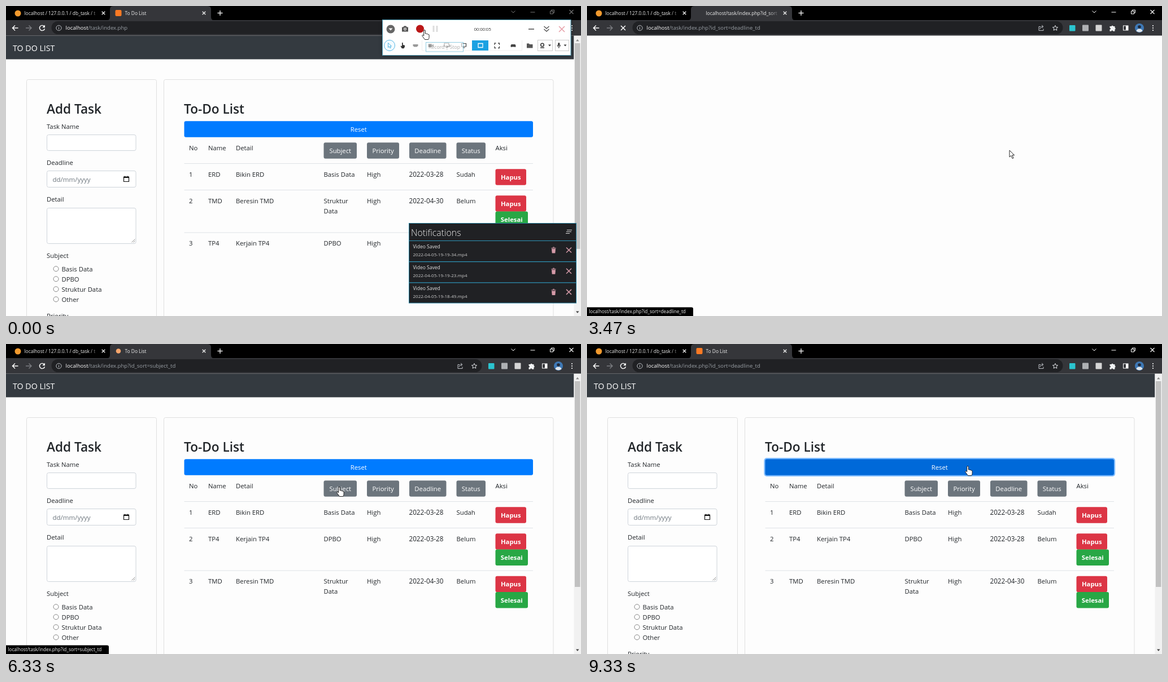
Animation of 1018 by 550 pixels, one loop 9.56 s. Source, as an HTML page:

```html
<!DOCTYPE html>
<html lang="id">
<head>
<meta charset="utf-8">
<title>To Do List</title>
<style>
  html, body { margin: 0; width: 100%; height: 100%; overflow: hidden; background: #fdfdfd; }
  svg { display: block; font-family: "Open Sans", "Noto Sans", sans-serif; }
  text { white-space: pre; }
</style>
</head>
<body>
<svg id="stage" width="1018" height="550" viewBox="0 0 1018 550"></svg>
<script>
const LOOP = 9560, INK = '#212529', GREY = '#6c757d';

// Drawing helpers
const text = (x, y, s, size = 11.3, fill = INK, more = '') =>
  `<text x="${x}" y="${y}" font-size="${size}" fill="${fill}" ${more}>${s}</text>`;
const rect = (x, y, w, h, fill, r = 0, more = '') =>
  `<rect x="${x}" y="${y}" width="${w}" height="${h}" rx="${r}" fill="${fill}" ${more}/>`;
const line = (d, stroke, width = 1, more = '') =>
  `<path d="${d}" fill="none" stroke="${stroke}" stroke-width="${width}" ${more}/>`;
const shape = (d, fill, more = '') => `<path d="${d}" fill="${fill}" ${more}/>`;
const dot = (x, y, r, fill, more = '') => `<circle cx="${x}" cy="${y}" r="${r}" fill="${fill}" ${more}/>`;
const at = (x, y, body) => `<g transform="translate(${x} ${y})">${body}</g>`;
const cross = (x, y, r, stroke, width = 1.3) =>
  line(`M${x - r} ${y - r}l${2 * r} ${2 * r}m0 ${-2 * r}l${-2 * r} ${2 * r}`, stroke, width);
const frame = (x, y, w, h, stroke, r = 3, fill = 'none') =>
  rect(x, y, w, h, fill, r, `stroke="${stroke}"`);
const button = (x, y, w, label, fill, bold, ring) =>
  (ring ? rect(x - 2.2, y - 2.2, w + 4.4, 32.9, ring, 5) : '') +
  rect(x, y, w, 28.5, fill, 3) +
  text(x + w / 2, y + 18.6, label, 11.3, '#fff', `text-anchor="middle"${bold ? ' font-weight="700"' : ''}`);
const clamp = v => Math.max(0, Math.min(1, v));

// Pointer tip: time, x, y
const path = [
  [700, 741, 43], [950, 800, 150], [1200, 886, 254], [1450, 888, 259], [1650, 872, 257],
  [1880, 833, 256], [2670, 833, 256], [3150, 748, 256], [4000, 748, 256], [4300, 694, 255],
  [4550, 667, 255], [5050, 667, 255], [5750, 590, 254], [7270, 590, 254], [7700, 670, 257],
  [8080, 746, 255], [8620, 746, 255], [8860, 712, 232], [9140, 680, 188], [9200, 677, 188],
  [9260, 674, 217]
];
function pointer(t) {
  const i = path.findIndex(p => p[0] > t);
  if (i < 0) return path.at(-1).slice(1);
  if (i === 0) return path[0].slice(1);
  const [t0, x0, y0] = path[i - 1], [t1, x1, y1] = path[i], k = (t - t0) / (t1 - t0);
  return [x0 + (x1 - x0) * k, y0 + (y1 - y0) * k];
}

const heads = [
  ['Subject', 562.5, 58.5], ['Priority', 639, 57], ['Deadline', 714, 65.5], ['Status', 797.5, 51.5]
];
function hovered(t) {
  const [x, y] = pointer(t);
  if (y > 204 && y < 233 && x > 315 && x < 933) return 'Reset';
  if (y > 242 && y < 271) return heads.find(h => x > h[1] && x < h[1] + h[2])?.[0];
}

const tasks = {
  ERD: ['Bikin ERD', 'Basis Data', '2022-03-28', 'Sudah'],
  TMD: ['Beresin TMD', 'Struktur Data', '2022-04-30', 'Belum'],
  TP4: ['Kerjain TP4', 'DPBO', '2022-03-28', 'Belum']
};
// Each page load: click, blank from, blank until, icon settled
const loads = [
  { key: 'Status', click: 2080, blank: 2150, shown: 2280, done: 2500, order: 'TMD TP4 ERD' },
  { key: 'Deadline', click: 3300, blank: 3400, shown: 3560, done: 3830, order: 'ERD TP4 TMD' },
  { key: 'Priority', click: 4640, blank: 4730, shown: 4870, done: 5120, order: 'ERD TMD TP4' },
  { key: 'Subject', click: 5970, blank: 6120, shown: 6270, done: 6570, order: 'ERD TP4 TMD' },
  { key: 'Deadline', click: 8230, blank: 8310, shown: 8450, done: 8700, order: 'ERD TP4 TMD' }
];
const query = key => `localhost/task/index.php?id_sort=${key.toLowerCase()}_td`;

function browser(load, t, active) {
  const blank = load && t < load.shown, loading = load && t < load.done;
  const dim = active ? '#fff' : '#777', icon = '#dfe1e5';
  const address = load ? query(load.key) : 'localhost/task/index.php';
  return rect(0, 0, 1018, 25, '#000') + rect(0, 25, 1018, 27.5, '#35363a') +
    shape('M178 25.5q6 0 6-6V6q0-6 6-6H357q6 0 6 6v13.5q0 6 6 6z', '#35363a') +
    dot(21, 13, 5.5, '#f29a2e') +
    text(32.5, 16, 'localhost / 127.0.0.1 / db_task / t', 8.4, 'url(#fadeA)') + cross(172.5, 12.5, 2.8, '#eee') +
    (blank ? '' : loading ? dot(199, 12.5, 4.3, '#f5a56c') : rect(193.5, 7, 11, 11, '#fb7a24', 2)) +
    text(210.5, 16, blank ? address.slice(0, 32) : 'To Do List', 8.4, 'url(#fadeB)') + cross(350.5, 12.5, 2.8, '#eee') +
    line('M374.5 12.5h9m-4.5-4.5v9', '#eee', 1.4) +
    line('M894.5 8.5l3.5 3.5 3.5-3.5', dim) + line('M928.5 11h8', dim) +
    line('M963.5 9h5v5h-5zm2 0V7h5v5h-2', dim) + cross(1001, 10.5, 3.5, dim, 1.1) +
    line('M21.5 39h-10m4.5-4.5L11.5 39l4.5 4.5', '#fff', 1.5) +
    line('M35 39h10m-4.5-4.5L45 39l-4.5 4.5', '#7c7e82', 1.4) +
    (blank ? cross(64, 39, 4, '#fff', 1.5) :
      line('M67.7 36.2a4.6 4.6 0 1 0 .8 4', '#fff', 1.4) + shape('M69 33.5v4.7h-4.7z', '#fff')) +
    rect(80.5, 27, 762, 23, '#202124', 11.5) +
    dot(93.5, 39, 4.6, 'none', 'stroke="#bdc1c6"') + line('M93.5 38.3v3.2m0-5v1.1', '#bdc1c6') +
    text(105.5, 42.3, `<tspan fill="#fff">localhost</tspan>${address.slice(9)}`, 9.55, '#9aa0a6') +
    line('M803 36.5h-3v7h8v-3M802 41q.5-4.500 5-4.500M805 34l3 2.500-3 2.500', '#bdc1c6') +
    line('M829 34.500l1.300 3 3.300.3-2.500 2.200.8 3.200-2.900-1.700-2.900 1.700.8-3.200-2.500-2.200 3.300-.3z', icon) +
    rect(854, 34, 10.500, 10.500, '#2bc4cf', 1) + rect(877, 33.500, 11, 11, '#aeb0b3', 1) + rect(900.500, 33.500, 11, 11, '#d5d5d5', 1) +
    shape('M925.500 36h3a1.700 1.700 0 0 1 3.200 0h2.800v2.500a1.700 1.700 0 0 1 0 3.200v3h-3.200a1.500 1.500 0 0 0-3 0h-2.800v-3.200a1.500 1.500 0 0 0 0-3z', '#f1f3f4') +
    frame(949.500, 35, 8.500, 8, '#fff', 0) + rect(954, 35, 4, 8, '#fff') +
    dot(978, 39, 8, '#3e78b5') + dot(978, 37, 2.800, '#202939') + shape('M972.500 44.500q1-4 5.500-4t5.500 4q-5.500 4-11 0z', '#e0e6ec') +
    [35, 39, 43].map(y => dot(1002, y, 1.100, '#fff')).join('');
}

function form() {
  const label = (y, s) => text(72, y, s);
  return frame(36.500, 130.500, 230, 440, '#dfdfdf') +
    text(72, 191, 'Add Task', 22.600, INK, 'font-weight="600"') +
    label(217.500, 'Task Name') + frame(72.500, 228.500, 157.500, 28, '#ced4da', 3, '#fff') +
    label(282, 'Deadline') + frame(72.500, 292.500, 157.500, 29, '#ced4da', 3, '#fff') +
    text(82.500, 312, 'dd/mm/yyyy', 11.500, GREY) +
    line('M208.500 303.500h9v8h-9z', '#111', 1.200) + rect(208, 302.500, 10, 2.500, '#111') + line('M210.500 301.500v2m5-2v2', '#111') +
    label(347, 'Detail') + frame(72.500, 358.500, 157.500, 63, '#ced4da', 3, '#fff') +
    line('M222.500 419.500l6-6m-3 6l3-3', '#777', .8) + label(447, 'Subject') +
    ['Basis Data', 'DPBO', 'Struktur Data', 'Other'].map((s, i) =>
      dot(88.500, 466.300 + 18 * i, 4.500, '#fff', 'stroke="#767676" stroke-width=".9"') +
      text(98.500, 471 + 17.900 * i, s)).join('') +
    label(554, 'Priority');
}

function table(order, hot, focus) {
  let y = 279.500;
  const rows = order.split(' ').map((name, i) => {
    const [detail, subject, date, status] = tasks[name], open = status === 'Belum';
    const lines = subject === 'Struktur Data' ? subject.split(' ') : [subject];
    const cell = (x, s, size) => text(x, y + 23.300, s, size);
    const row = line(`M315.500 ${y}H933`, '#dee2e6') + cell(324, i + 1) + cell(358, name) + cell(407, detail) +
      lines.map((s, n) => text(562.500, y + 23.300 + 18 * n, s)).join('') +
      cell(639, 'High') + cell(713.500, date, 11.700) + cell(797.500, status) +
      button(866.500, y + 9.700, 54.500, 'Hapus', '#dc3545', true) +
      (open ? button(866.500, y + 38.100, 57.500, 'Selesai', '#28a745', true) : '');
    y += open ? 75.500 : 47;
    return row;
  }).join('');
  return frame(279.500, 130.500, 689.500, 440, '#dfdfdf') +
    text(315, 191, 'To-Do List', 22.600, INK, 'font-weight="600"') +
    button(315.500, 204.200, 617.500, 'Reset', hot === 'Reset' ? '#0069d9' : '#007bff', false, focus === 'Reset' && '#80bdff') +
    [[324, 'No'], [358, 'Name'], [407, 'Detail'], [866.500, 'Aksi']].map(([x, s]) => text(x, 256, s)).join('') +
    heads.map(([s, x, w]) =>
      button(x, 242.200, w, s, hot === s ? '#545b62' : GREY, false, focus === s && '#b5babe')).join('') + rows;
}

function page(load, t) {
  const since = load ? load.shown : 0;
  const still = String(pointer(t)) === String(pointer(since));
  const focus = t >= 9260 ? 'Reset' : loads.find(l => t >= l.click && t < l.blank)?.key;
  const hot = still && load ? null : hovered(t - (t > 9200 ? 0 : 120));
  return rect(0, 52.500, 1005.500, 42, '#343a40') + text(12, 79.600, 'TO DO LIST', 14.200, '#fff') +
    form() + table(load ? load.order : 'ERD TMD TP4', hot, focus) +
    rect(1005.500, 52.500, 12.500, 498, '#f1f1f1') + rect(1007, 66, 9.500, 365, '#c1c1c1') +
    shape('M1009 62.500l2.800-3.500 2.800 3.500z', '#888') + shape('M1009 541.500l2.800 3.500 2.800-3.500z', '#444');
}

function recorder(t) {
  const on = t >= 100, c = on ? '#8a8a8a' : '#444', d = '#555';
  const clock = !on ? 5 : t < 1000 ? 0 : 1;
  const monitor = (x, y) => line(`M${x - 4} ${y - 3.500}h8v5.500h-8zM${x - 2} ${y + 4}h4`, c, 1.200);
  return rect(666, 25, 335, 64, '#000', 0, 'opacity=".3" filter="url(#soft)"') +
    frame(666.500, 24.500, 333.500, 63, '#4c9db8', 0, '#fff') +
    dot(681, 41, 7.500, '#666') + shape('M677.500 39.500h7l-3.500 4z', '#fff') +
    shape('M701 37.500h2.500l1-2h4l1 2h2.500v8h-11z', d) + dot(706.500, 41, 2.400, '#fff') + dot(706.500, 41, 1.300, d) +
    (on ? rect(727, 34.500, 12.500, 12, '#c94a4a') : dot(733, 40.500, 7, '#ba1717')) +
    rect(755.500, 35, 3, 11, on ? '#666' : '#ddd') + rect(761.500, 35, 3, 11, on ? '#666' : '#ddd') +
    text(828.500, 44, '00:00:0' + clock, 8, '#333', 'letter-spacing="-.2"') +
    line('M925 41h10', d, 1.600) + line('M952.500 36l4.500 4 4.500-4m-9 5l4.500 4 4.500-4', d, 1.400) +
    cross(984, 41, 5, '#e8a3ac', 1.700) +
    line('M736.500 61v18h177V61', '#eee') +
    dot(679, 70, 9.500, '#f4fbff', 'stroke="#55b7e5"') + line('M676.500 65.500v8l2-1.700 1.500 3 1.500-.8-1.500-2.800h2.500z', '#55b7e5') +
    shape('M701 65h1.700v4l3.300.8v2.500l-1.500 3h-3.700l-2.300-4 1-.8 1.500 1z', '#333') +
    shape('M720.500 68h9v2.500l-2 2h-5l-2-2z', '#999') +
    rect(747.500, 67, 6.500, 6, c, 1) + shape('M754 69.500l3-2v5l-3-2z', c) +
    monitor(780, 69.500) + line('M780.500 72.500h5v-4', c) + monitor(810.500, 70) +
    rect(825, 61, 29, 18, '#1ba1e2') + line('M836 66.500h8v7h-8z', on ? '#43637a' : '#fff', 1.300, on ? 'stroke-dasharray="2 1"' : '') +
    line('M865 69v-3h2.500m3.500 0h2.500v3m0 2.500v3h-2.500m-3.500 0h-2.500v-3', c, 1.300) +
    shape('M895.500 68h5q2 0 2 3t-2 1.500h-5q-2 1.500-2-1.500t2-3z', c) +
    shape('M922 66.500h4l1 1.500h5.500v6.500H922z', '#555') +
    frame(941.500, 60.500, 26, 19, '#ccc', 0) + dot(949.500, 69, 2.800, 'none', 'stroke="#333" stroke-width="1.500"') + line('M946 74h7', '#333', 1.500) +
    frame(972.500, 60.500, 24, 19, '#ccc', 0) + rect(977.300, 65, 3, 6, '#333', 1.500) + line('M976 69q0 3.500 2.800 3.500t2.800-3.500m-2.800 3.500v2.500', '#333') +
    [962.500, 990].map(x => shape(`M${x - 2.500} 68.500h5l-2.500 3z`, '#333')).join('') +
    `<g opacity="${.6 * clamp(1 - t / 130)}">${frame(743.500, 64.500, 66, 16.500, '#4aaccf', 0, '#fff')}${text(748, 76, 'Record | Stop', 8.700, '#777')}</g>`;
}

function notices(t) {
  const pink = '#d59aa8', items = ['19-34', '19-23', '18-49'];
  return `<g opacity="${clamp(1 - (t - 30) / 220)}">` + frame(713.500, 385.500, 296, 141.500, '#257f9f', 0, '#202124') +
    text(717, 407.500, 'Notifications', 15.800, '#eee', 'font-weight="300"') +
    line('M993 397.500h9m-10 3h9m-10 3h7', '#ddd') +
    items.map((s, i) => at(0, 37.200 * i, line('M713.500 416.500h296', '#2e93b5', 1.200) +
      text(720.500, 430, 'Video Saved', 8.500, '#e4e4e4') + text(720.500, 444, `2022-04-05-19-${s}.mp4`, 8, '#ccc') +
      shape('M965.500 429h8v1.200h-8zm2.500-1.500h3v1h-3zM966 431h7l-.7 7.500h-5.600z', pink) + cross(996.500, 433, 4.500, pink, 1.500))).join('') + '</g>';
}

function statusBar(t) {
  for (let k = 50; k < 550; k += 20) {
    const key = hovered(t - k);
    if (key && key !== 'Reset' && t > 1750) {
      const w = { Status: 177, Deadline: 188, Priority: 180, Subject: 182 }[key];
      return shape(`M0 534.500H${w - 3}q3 0 3 3V550H0z`, '#000') + text(3.500, 545.300, query(key), 8.150, '#f4f4f4');
    }
  }
  return '';
}

function cursor(t, blank) {
  const [x, y] = pointer(t), hand = t < 760 || (!blank && hovered(t - (t > 9200 ? 0 : 50)));
  const d = hand
    ? 'M-1.300 1q0-1.500 1.300-1.500T1.300 1v5q2-.8 2.500.6 1.800-.5 2.300.7 2-.3 2 1.500v3.700q0 2-1.400 4H.5l-4.300-6q-1-1.800.4-2.200 1.100-.1 2.100 1.600z'
    : 'M0 0v12l2.800-2.600 2.300 5.200 2-.9-2.300-5h3.800z';
  return at(x, y, shape(d, '#fff', 'stroke="#111" stroke-width=".9" stroke-linejoin="round"'));
}

const fade = (id, from, to) =>
  `<linearGradient id="${id}" gradientUnits="userSpaceOnUse" x1="${from}" x2="${to}"><stop stop-color="#eee"/><stop offset="1" stop-color="#eee" stop-opacity="0"/></linearGradient>`;
const defs = `<defs>${fade('fadeA', 148, 165)}${fade('fadeB', 322, 341)}<filter id="soft"><feGaussianBlur stdDeviation="3"/></filter></defs>`;

function scene(t) {
  const load = loads.findLast(l => t >= l.blank), blank = load && t < load.shown;
  const docked = t < 1690;
  // A pointer at rest keeps its link shown in the corner
  return defs + rect(0, 0, 1018, 550, '#fdfdfd') + (blank ? '' : page(load, t)) + browser(load, t, !docked) +
    (docked ? recorder(t) : '') + (t < 250 ? notices(t) : '') + statusBar(t) + cursor(t, blank);
}

const stage = document.getElementById('stage');
let last;
function tick() {
  const now = scene(performance.now() % LOOP);
  if (now !== last) stage.innerHTML = last = now;
  requestAnimationFrame(tick);
}
tick();
</script>
</body>
</html>
```
